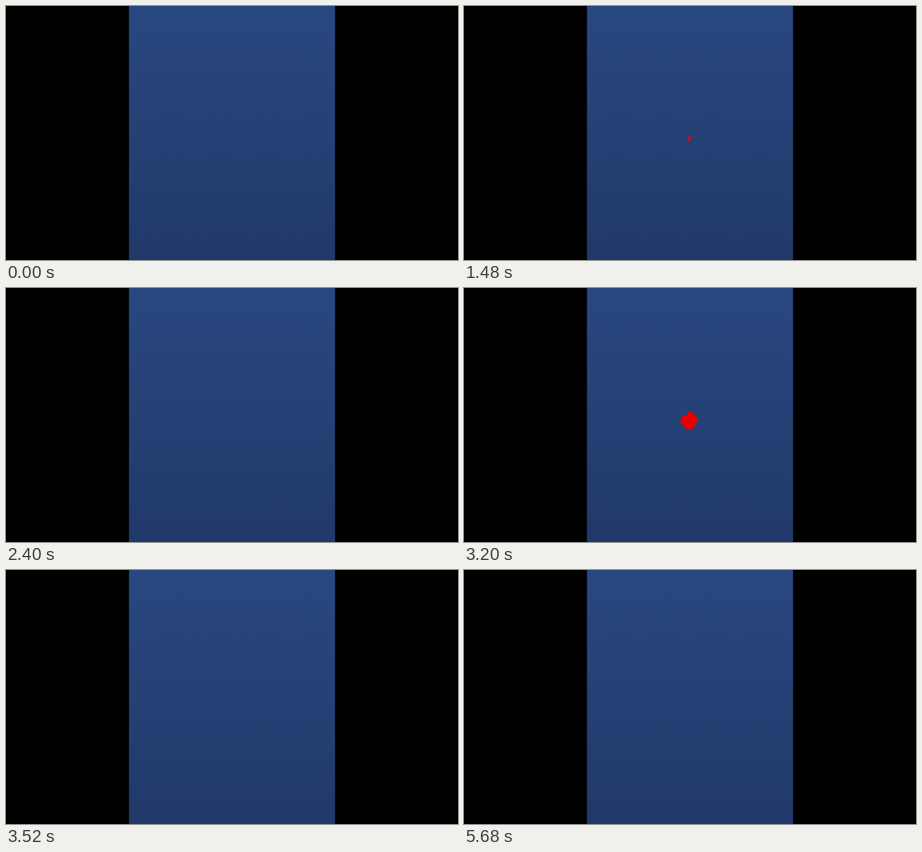
Animation, 998 px wide and 561 px high, one loop 5.72 s. Source, as an HTML page with a canvas:

```html
<!DOCTYPE html>
<html lang="en">
<head>
<meta charset="utf-8">
<title>Red bursts</title>
<style>
html, body { margin: 0; width: 100%; height: 100%; overflow: hidden; background: #000; }
canvas { display: block; }
</style>
</head>
<body>
<canvas id="stage" width="998" height="561"></canvas>
<script>
const W = 998, H = 561, LOOP = 5720, STEP = 40;
const LEFT = 271.5, RIGHT = 726.5;
const CELL = 3.8;                        // size of one coarse pixel
const CX = 497, CY = 293;                // burst centre
const FIRST = 360, EVERY = 560, BURSTS = 9;
const SPARKS = 95, SPEED = 30, LIFE = 9.5; // px per step, life in steps

const ctx = document.getElementById("stage").getContext("2d");

const sky = ctx.createLinearGradient(0, 0, 0, H);
sky.addColorStop(0, "rgb(41,72,128)");
sky.addColorStop(1, "rgb(33,57,106)");

function random(seed) {
  let s = seed;
  return () => {
    s = (s + 0x6D2B79F5) | 0;
    let t = Math.imul(s ^ (s >>> 15), s | 1);
    t ^= t + Math.imul(t ^ (t >>> 7), t | 61);
    return ((t ^ (t >>> 14)) >>> 0) / 4294967296;
  };
}

function makeBurst(n) {
  const rnd = random(n * 101 + 7);
  const sparks = Array.from({ length: SPARKS }, () => {
    const angle = rnd() * Math.PI * 2;
    const speed = SPEED * Math.pow(rnd(), 0.6);
    return { vx: Math.cos(angle) * speed, vy: Math.sin(angle) * speed };
  });
  return { start: FIRST + n * EVERY, sparks };
}

const bursts = Array.from({ length: BURSTS }, (_, n) => makeBurst(n));
const snap = v => Math.round(v / CELL) * CELL;

function drawBurst(sparks, k) {
  const age = Math.max(0, k - 0.5);
  ctx.globalAlpha = Math.min(1, (LIFE - k) / (LIFE - 1));
  ctx.fillStyle = "rgb(230,0,0)";
  for (const { vx, vy } of sparks) {
    const x = CX + snap(vx * age), y = CY + snap(vy * age);
    ctx.fillRect(x - CELL, y - CELL, CELL * 2, CELL * 2);
  }
  ctx.globalAlpha = 1;
}

function draw(t) {
  ctx.fillStyle = "#000";
  ctx.fillRect(0, 0, W, H);
  ctx.save();
  ctx.beginPath();
  ctx.rect(LEFT, 0, RIGHT - LEFT, H);
  ctx.clip();
  ctx.fillStyle = sky;
  ctx.fillRect(0, 0, W, H);
  for (const { start, sparks } of bursts) {
    const k = Math.floor((t - start) / STEP);
    if (k >= 0 && k < LIFE - 0.5) drawBurst(sparks, k);
  }
  ctx.restore();
}

const begin = performance.now();
function tick() {
  draw((performance.now() - begin) % LOOP);
  requestAnimationFrame(tick);
}
tick();
</script>
</body>
</html>
```
